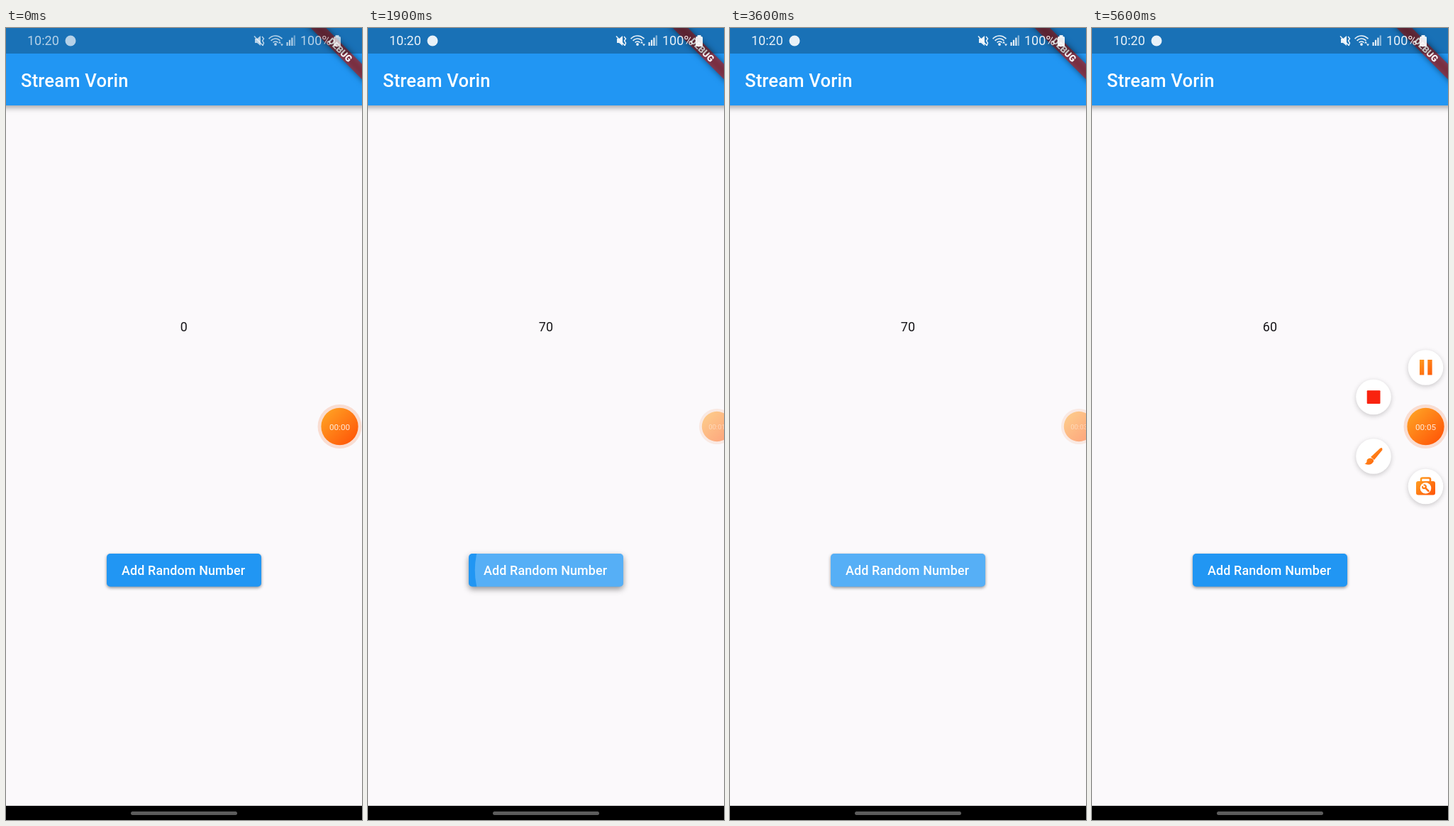
Write an HTML page with a canvas that moves like this. It is 502 px wide and 1115 px high and loops after 5700 ms.

```html
<!DOCTYPE html>
<html lang="en">
<head>
<meta charset="utf-8">
<title>Stream demo</title>
<style>
html, body { margin: 0; width: 100%; height: 100%; overflow: hidden; background: #fbf9fb; }
canvas { display: block; width: 502px; height: 1115px; }
</style>
</head>
<body>
<canvas id="stage" width="502" height="1115"></canvas>
<script>
const ctx = document.getElementById('stage').getContext('2d');
const W = 502, H = 1115, LOOP = 5700, STEP = 100;
const BLUE = '#2196f3';
const BTN = { x: 142, y: 740, w: 218, h: 46.5, r: 5 };

// Taps on the button: finger down, finger up, number shown from `at`, touch x
const TAPS = [
  { down: 60, up: 180, at: 200, n: 60, x: 270 },
  { down: 1550, up: 1820, at: 1900, n: 70, x: 295 },
  { down: 2220, up: 2310, at: 2400, n: 20, x: 280 },
  { down: 2830, up: 2930, at: 3000, n: 50, x: 280 },
  { down: 3320, up: 3420, at: 3500, n: 70, x: 270 },
  { down: 4040, up: 4180, at: 4200, n: 30, x: 298 },
  { down: 4380, up: 4470, at: 4500, n: 60, x: 290 }
];
const TICKS = [1500, 2500, 3500, 4200, 5100];

const clamp = v => Math.max(0, Math.min(1, v));
const ramp = (t, a, b) => clamp((t - a) / (b - a));
const easeOut = v => 1 - (1 - v) ** 2;
const mix = (a, b, v) => a + (b - a) * v;

function layer(alpha, draw) {
  ctx.save();
  ctx.globalAlpha *= alpha;
  draw();
  ctx.restore();
}
function rect(x, y, w, h, fill) {
  ctx.fillStyle = fill;
  ctx.fillRect(x, y, w, h);
}
function round(x, y, w, h, r, fill) {
  ctx.beginPath();
  ctx.roundRect(x, y, w, h, r);
  ctx.fillStyle = fill;
  ctx.fill();
}
function disc(x, y, r, fill) {
  ctx.beginPath();
  ctx.arc(x, y, r, 0, Math.PI * 2);
  ctx.fillStyle = fill;
  ctx.fill();
}
function poly(points, fill) {
  ctx.beginPath();
  points.forEach(([x, y]) => ctx.lineTo(x, y));
  ctx.fillStyle = fill;
  ctx.fill();
}
function arc(x, y, r, a, b, width, color) {
  ctx.beginPath();
  ctx.arc(x, y, r, a, b);
  ctx.lineWidth = width;
  ctx.strokeStyle = color;
  ctx.stroke();
}
function line(x1, y1, x2, y2, width, color) {
  ctx.beginPath();
  ctx.moveTo(x1, y1);
  ctx.lineTo(x2, y2);
  ctx.lineWidth = width;
  ctx.strokeStyle = color;
  ctx.stroke();
}
function text(str, x, y, size, weight, color, align = 'left', spacing = 0) {
  ctx.font = `${weight} ${size}px Roboto, sans-serif`;
  ctx.letterSpacing = spacing + 'px';
  ctx.textAlign = align;
  ctx.fillStyle = color;
  ctx.fillText(str, x, y);
}
function shadow(alpha, blur, dy) {
  ctx.shadowColor = `rgba(0,0,0,${alpha})`;
  ctx.shadowBlur = blur;
  ctx.shadowOffsetY = dy;
}
function orange(x, y, r) {
  const g = ctx.createLinearGradient(x - r, y - r, x + r, y + r);
  g.addColorStop(0.1, '#ffa023');
  g.addColorStop(0.9, '#ff5708');
  return g;
}

function appBar() {
  layer(1, () => {
    shadow(0.36, 8, 3);
    rect(-20, 0, W + 40, 109, BLUE);
  });
  text('Stream Vorin', 21, 82.5, 25.6, 500, '#fff', 'left', 0.19);
}

function debugBanner() {
  ctx.save();
  ctx.translate(W, 0);
  ctx.rotate(Math.PI / 4);
  layer(1, () => {
    // The casting shape sits off stage so that only its shadow shows
    ctx.shadowColor = 'rgba(0,0,0,0.5)';
    ctx.shadowBlur = 9;
    ctx.shadowOffsetX = 2000;
    ctx.translate(-2000 * Math.SQRT1_2, 2000 * Math.SQRT1_2);
    rect(-60, 35.8, 120, 15.3, '#000');
  });
  rect(-60, 35.8, 120, 15.3, 'rgba(183,28,28,0.627)');
  text('DEBUG', 0, 48.1, 13, 900, '#fff', 'center');
  ctx.restore();
}

function statusBar(alpha) {
  const c = '#fff';
  layer(alpha, () => {
    text('10:20', 30, 24, 18, 400, c);
    disc(91, 18, 7.5, c);

    // muted speaker with vibration marks
    poly([[351, 15], [354, 15], [359, 11], [359, 25], [354, 21], [351, 21]], c);
    line(350, 11.5, 362, 24.5, 1.6, c);
    ctx.beginPath();
    [[361, 12], [363.5, 15], [361.5, 18], [363.5, 21], [362, 25]].forEach(([x, y]) => ctx.lineTo(x, y));
    ctx.lineWidth = 1.5;
    ctx.stroke();

    // wireless arcs and data arrows
    [4.5, 8.5, 12.5].forEach(r => arc(380, 23.5, r, -Math.PI * 0.77, -Math.PI * 0.23, 1.7, c));
    disc(380, 23, 1.9, c);
    poly([[384, 21.5], [386, 18.5], [388, 21.5]], c);
    poly([[387, 22.5], [391, 22.5], [389, 25.5]], c);

    for (let i = 0; i < 4; i++) {
      const h = 5 + i * 3.2;
      layer(i < 3 ? 1 : 0.55, () => rect(395.5 + i * 3.4, 25 - h, 2.2, h, c));
    }
    text('100%', 415, 24, 18, 400, c);
    round(462, 12, 10, 14, 1.5, c);
    rect(464.5, 10, 5, 3, c);
  });
}

function micChip(v) {
  if (v <= 0) return;
  ctx.save();
  ctx.translate(468, 18);
  ctx.scale(v, v);
  disc(0, 0, 12.4, '#4db35c');
  round(-2.6, -8, 5.2, 10, 2.6, '#fff');
  arc(0, -1, 5, 0, Math.PI, 1.5, '#fff');
  line(0, 4, 0, 7.5, 1.6, '#fff');
  ctx.restore();
}

function ripple(tap, t) {
  if (t < tap.down || t > tap.up + 375) return;
  const held = Math.min(t, tap.up) - tap.down;
  const grow = easeOut(clamp(held / 1000 + Math.max(0, t - tap.up) / 225));
  const alpha = 0.24 * ramp(t, tap.down, tap.down + 75) * (1 - ramp(t, tap.up + 225, tap.up + 375));
  const x = mix(tap.x, BTN.x + BTN.w / 2, grow);
  disc(x, BTN.y + BTN.h / 2, 118 * mix(0.3, 1, grow), `rgba(255,255,255,${alpha})`);
}

function button(t) {
  const lift = Math.max(...TAPS.map(p =>
    ramp(t, p.down, p.down + 150) * (1 - ramp(t, p.up, p.up + 180))));
  const { x, y, w, h, r } = BTN;
  layer(1, () => {
    shadow(0.42, mix(4, 12, lift), mix(1.8, 5, lift));
    round(x, y, w, h, r, BLUE);
  });
  layer(1, () => {
    ctx.beginPath();
    ctx.roundRect(x, y, w, h, r);
    ctx.clip();
    TAPS.forEach(p => ripple(p, t));
  });
  text('Add Random Number', 163, 769.7, 17.9, 500, '#fff', 'left', 0.13);
}

function menuItem(x, y, v, icon) {
  layer(clamp(v * 2), () => {
    ctx.translate(mix(470.5, x, v), mix(561, y, v));
    ctx.scale(mix(0.4, 1, v), mix(0.4, 1, v));
    layer(1, () => {
      shadow(0.2, 7, 2);
      disc(0, 0, 24.8, '#fff');
    });
    icon(orange(0, 0, 14));
  });
}
function pauseIcon(c) {
  rect(-8.5, -11, 6.3, 21.5, c);
  rect(2.8, -11, 6.3, 21.5, c);
}
function stopIcon() {
  round(-9.3, -9.3, 18.8, 18.8, 1, '#f9230f');
}
function brushIcon(c) {
  poly([[-4, 1], [9.5, -11.5], [12, -12], [12.5, -9], [1, 5]], c);
  ctx.beginPath();
  ctx.moveTo(-5, 2.5);
  ctx.quadraticCurveTo(1, 3, 0, 7.5);
  ctx.quadraticCurveTo(-4, 14, -12.5, 10.5);
  ctx.quadraticCurveTo(-9, 9, -9.5, 6);
  ctx.quadraticCurveTo(-9, 3, -5, 2.5);
  ctx.fill();
}
function toolIcon(c) {
  round(-13.5, -7.5, 27, 19.5, 3, c);
  ctx.beginPath();
  ctx.roundRect(-6.5, -12, 13, 8, 2);
  ctx.lineWidth = 2.6;
  ctx.strokeStyle = c;
  ctx.stroke();
  disc(0, 2.3, 7.8, '#fff');
  ctx.lineCap = 'round';
  line(-0.5, 1.8, 4, 6.3, 2.6, c);
  arc(-2, 0.3, 2.4, -Math.PI * 0.5, Math.PI, 2.2, c);
}

function menu(t) {
  const v = easeOut(ramp(t, 4750, 5100));
  if (v <= 0) return;
  menuItem(470.5, 478, v, pauseIcon);
  menuItem(397, 519.5, v, stopIcon);
  menuItem(397, 603, v, brushIcon);
  menuItem(470.5, 645.5, v, toolIcon);
}

function bubble(t) {
  const dock = easeOut(ramp(t, 1080, 1500)) * (1 - ramp(t, 4650, 4800));
  const faded = t >= 1100 && t < 4700;
  const seconds = TICKS.filter(k => t >= k).length;
  ctx.save();
  ctx.translate(mix(470.5, 492, dock), 561);
  ctx.scale(mix(1, 0.81, dock), mix(1, 0.81, dock));
  disc(0, 0, 31, faded ? '#f9e9e3' : '#f9ddd2');
  disc(0, 0, 26.2, '#fbf9fb');
  layer(faded ? 0.52 : 1, () => {
    disc(0, 0, 26.2, orange(0, 0, 26));
    text('00:0' + seconds, 0, 4.5, 11.7, 400, 'rgba(255,255,255,0.85)', 'center');
  });
  ctx.restore();
}

function statusAlpha(t) {
  if (t < 1100) return 0.68 * (1 - ramp(t, 0, 300));
  return 0.9 * ramp(t, 1500, 1800);
}

function draw(t) {
  rect(0, 0, W, H, '#fbf9fb');
  appBar();
  const last = TAPS.filter(p => t >= p.at).pop();
  text(last ? last.n : 0, 251, 427.4, 17.9, 400, '#171619', 'center', 0.32);
  button(t);
  debugBanner();
  rect(0, 0, W, 36, 'rgba(0,0,0,0.25)');
  statusBar(statusAlpha(t));
  micChip(easeOut(ramp(t, 200, 500)) * (1 - ramp(t, 1400, 1700)));
  menu(t);
  bubble(t);
  rect(0, 1095, W, 20, '#000');
  round(176, 1103, 150, 5, 2.5, '#5c5c5c');
}

const start = performance.now();
function frame() {
  const t = (performance.now() - start) % LOOP;
  draw(Math.floor(t / STEP) * STEP);
  requestAnimationFrame(frame);
}
frame();
</script>
</body>
</html>
```
